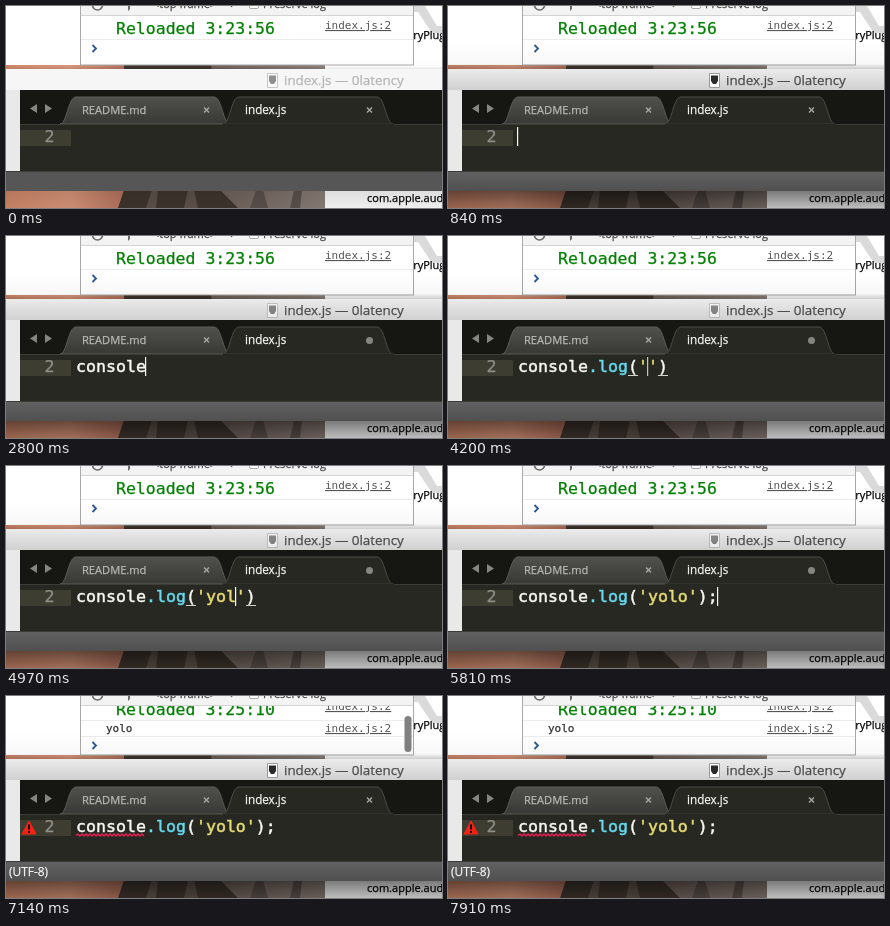
Write an HTML page that moves like this. It is 436 px wide and 202 px high and loops after 8 s.

```html
<!DOCTYPE html>
<html lang="en">
<head>
<meta charset="utf-8">
<title>Typing in an editor</title>
<style>
html, body { margin: 0; width: 100%; height: 100%; overflow: hidden; background: #fff; }
svg { display: block; width: 436px; height: 202px; }
text {
  font-family: "Open Sans", "Noto Sans", sans-serif; white-space: pre;
  fill: currentColor; stroke: currentColor; stroke-width: .25;
}
.mono { font-family: "DejaVu Sans Mono", monospace; }
.code { font-size: 16.6px; color: #f8f8f2; stroke-width: .5; }
.small { font-size: 11px; }
.link { color: #545454; stroke: none; text-decoration: underline; }
.cross { stroke: #a8a8a2; stroke-width: 1.4; fill: none; }
.on { display: none; }
.active .on { display: inline; }
.active .off { display: none; }
#title { font-size: 13.4px; color: #b4b4b4; }
.active #title { color: #4b4b4b; }
</style>
</head>
<body>
<svg id="stage" viewBox="0 0 436 202">
  <defs>
    <linearGradient id="sky">
      <stop offset="0" stop-color="#d0886a"/><stop offset=".2" stop-color="#d9967a"/>
      <stop offset=".36" stop-color="#b8755f"/><stop offset=".6" stop-color="#6b5d56"/>
      <stop offset="1" stop-color="#8c8079"/>
    </linearGradient>
    <linearGradient id="bar" x2="0" y2="1">
      <stop offset="0" stop-color="#ebebeb"/><stop offset="1" stop-color="#d0d0d0"/>
    </linearGradient>
    <linearGradient id="tabFill" x2="0" y2="1">
      <stop offset="0" stop-color="#50514c"/><stop offset="1" stop-color="#383934"/>
    </linearGradient>
    <linearGradient id="status" x2="0" y2="1">
      <stop offset="0" stop-color="#626262"/><stop offset="1" stop-color="#505050"/>
    </linearGradient>
    <linearGradient id="above" x2="0" y2="1">
      <stop offset="0" stop-opacity="0"/><stop offset=".8" stop-opacity=".03"/><stop offset="1" stop-opacity=".2"/>
    </linearGradient>
    <linearGradient id="below" x2="0" y2="1">
      <stop offset="0" stop-opacity=".52"/><stop offset="1" stop-opacity=".26"/>
    </linearGradient>
    <clipPath id="body"><rect x="75" y="10" width="332" height="49"/></clipPath>
    <path id="tab" d="M54 118C61 118 62 91 70 91H208C216 91 217 118 224 118Z"/>
  </defs>

  <!-- desktop and file list -->
  <rect width="320" height="202" fill="url(#sky)"/>
  <path d="M112 202L118 184V57H205L214 184 232 202Z" fill="#40362f"/>
  <path d="M140 202L146 184H152L150 202ZM178 202L182 184H188L192 202Z" fill="#5f534b"/>
  <path d="M244 202L250 184H257L262 202ZM284 202L288 184H296L294 202Z" fill="#5c524d"/>
  <rect x="319" width="117" height="202" fill="#fff"/>
  <path d="M408 0H419L431 20H436V27H426L412 6H408Z" fill="#dadada"/>
  <text class="small" x="400.5" y="33">oryPlugin</text>
  <text class="small" x="361" y="196">com.apple.audio</text>

  <!-- console -->
  <rect width="75" height="59" fill="#fff"/>
  <rect x="74.500" y="-1" width="333" height="60" fill="#fff" stroke="#a9a9a9"/>
  <rect x="75" width="332" height="9" fill="#f3f3f3"/>
  <path d="M75 9.500H407" stroke="#d4d4d4"/>
  <circle cx="91.500" cy="-1" r="5" fill="none" stroke="#6a6a6a" stroke-width="1.6"/>
  <path d="M119 0H124V3L122 5V0ZM222 -3H229L225.500 1.500Z" fill="#6a6a6a"/>
  <rect x="243.500" y="-7" width="9" height="9.500" rx="1.500" fill="#fff" stroke="#aaa"/>
  <g class="small" color="#444">
    <text x="147" y="2">&lt;top frame&gt;</text>
    <text x="257" y="2">Preserve log</text>
  </g>
  <g clip-path="url(#body)">
    <g id="row">
      <text id="log" class="mono" x="110" y="28" font-size="16.5" color="#008000"></text>
      <text class="mono small link" x="319" y="23">index.js:2</text>
      <path d="M75 33.500H407" stroke="#ececec"/>
    </g>
    <g id="output">
      <text class="mono small" x="100" y="36" color="#303030" stroke="none">yolo</text>
      <text class="mono small link" x="319" y="36">index.js:2</text>
      <path d="M75 40.500H407" stroke="#ececec"/>
    </g>
    <path id="prompt" d="M86.500 39L90 42.500 86.500 46" fill="none" stroke="#2c5796" stroke-width="1.800"/>
    <rect id="thumb" x="398.500" y="20" width="7" height="36" rx="3.500" fill="#808080"/>
  </g>

  <!-- editor window -->
  <rect class="off" y="50" width="436" height="13" fill="url(#above)" opacity=".5"/>
  <rect class="on" y="36" width="436" height="27" fill="url(#above)"/>
  <rect y="63" width="436" height="21" fill="#f6f6f6"/>
  <rect class="on" y="63" width="436" height="21" fill="url(#bar)"/>
  <g id="icon">
    <path d="M261.500 67.500H271.500V81.500H261.500Z" fill="#fff" stroke="#999"/>
    <path d="M263 69.500H270V75L268 78H265L263 75Z" fill="#2a2a2a"/>
  </g>
  <text id="title" x="278" y="79">index.js — 0latency</text>

  <rect y="84" width="14" height="81" fill="#e9e9e9"/>
  <rect x="14" y="84" width="422" height="34" fill="#161713"/>
  <rect x="14" y="118" width="422" height="47" fill="#272822"/>
  <path d="M31 98V107L24 102.500ZM39 98V107L46 102.500Z" fill="#858681"/>
  <use href="#tab" fill="url(#tabFill)" stroke="#5c5d57"/>
  <path d="M14 118.500H436" stroke="#3c3d37"/>
  <use href="#tab" x="163" fill="#272822" stroke="#4c4d46"/>
  <rect x="217" y="117.500" width="171" height="2" fill="#272822"/>
  <text x="76" y="108" font-size="11.100" color="#b9b9b3">README.md</text>
  <text x="239" y="108" font-size="11.700" color="#f4f4f0">index.js</text>
  <path class="cross" d="M198 101.500l5 5m0-5l-5 5"/>
  <path id="close" class="cross" d="M361 101.500l5 5m0-5l-5 5"/>
  <circle id="dot" cx="363.500" cy="104.500" r="3.500" fill="#85867f"/>

  <rect x="14" y="124" width="51" height="16" fill="#3e3d32"/>
  <text class="mono" x="38.500" y="136" font-size="16.600" color="#8f908a">2</text>
  <text class="mono code" x="70" y="136"><tspan id="word"></tspan><tspan id="prop"></tspan><tspan id="open"></tspan><tspan id="str" fill="#e6db74" stroke="#e6db74"></tspan><tspan id="end"></tspan></text>
  <path id="pair" fill="none" stroke="#d0d0c8"/>
  <rect id="caret" y="121" width="1.200" height="19" fill="#f8f8f0"/>

  <rect y="165" width="436" height="20" fill="#565656"/>
  <rect class="on" y="165" width="436" height="20" fill="url(#status)"/>
  <path d="M0 165.500H436" stroke="#3a3a38"/>
  <rect class="off" y="185" width="436" height="17" fill="url(#below)" opacity=".25"/>
  <rect class="on" y="185" width="436" height="17" fill="url(#below)"/>

  <g id="lint">
    <path d="M23 125L30 138H16Z" fill="#f5220f" stroke="#f5220f" stroke-linejoin="round"/>
    <path d="M23 128.500V133.500M23 135V137" stroke="#100" stroke-width="2"/>
    <path id="wave" fill="none" stroke="#f0205a" stroke-width="1.300"/>
    <text x="3" y="179.500" font-size="11.900" color="#f4f4f4" stroke-width=".5">(UTF-8)</text>
  </g>
</svg>
<script>
const LOOP = 8000, SAVED = 6160, CELL = 10, LEFT = 70;
const CODE = "console.log('yolo');";

// time, keys typed, caret opacity
const KEYS = [
  [0, 0, 0], [840, 0, 1], [1120, 0, .7], [1190, 0, .35], [1260, 0, 0],
  [1400, 1, 1], [1610, 2, 1], [1890, 2, .7], [1960, 3, 1], [2030, 4, 1], [2170, 5, 1],
  [2450, 5, .7], [2590, 6, 1], [2800, 7, 1], [2940, 8, 1], [3080, 9, 1], [3220, 10, 1], [3360, 11, 1],
  [3640, 11, .7], [3780, 12, 1], [3920, 13, 1], [4200, 13, .75], [4340, 13, .35],
  [4480, 14, 1], [4690, 15, 1], [4900, 16, 1], [5110, 17, 1],
  [5390, 18, 1], [5530, 19, 1], [5810, 20, 1],
  [6510, 20, .7], [6580, 20, .35], [6720, 20, 0], [7210, 20, .5], [7350, 20, 1],
  [7630, 20, .7], [7700, 20, .35], [7770, 20, 0]
];
// time, scrollbar opacity
const THUMB = [[0, 0], [7140, 1], [7700, .75], [7770, .5], [7840, .25], [7910, 0]];

const el = {};
document.querySelectorAll("[id]").forEach(e => el[e.id] = e);
const at = (steps, t) => steps.filter(s => s[0] <= t).pop();
const show = (e, on) => e.style.display = on ? "inline" : "none";
const put = (e, s) => { if (e.textContent !== s) e.textContent = s; };

let wave = "M70 139.5";
for (let i = 1; i <= 34; i++) wave += `L${70 + i * 2} ${i % 2 ? 138 : 140}`;
el.wave.setAttribute("d", wave);

// auto-closed characters to the right of the caret
function tail(n) {
  if (n < 12 || n > 18) return "";
  return n > 12 && n < 18 ? "')" : ")";
}

function draw(t) {
  const [, n, glow] = at(KEYS, t);
  const line = CODE.slice(0, n) + tail(n);
  const closing = line.lastIndexOf(")");
  const strEnd = closing < 0 ? 12 : closing;
  const dirty = n > 0 && t < SAVED;
  const propColor = n > 10 ? "#66d9ef" : "#f8f8f2";

  put(el.word, line.slice(0, 7));
  put(el.prop, line.slice(7, 11));
  el.prop.setAttribute("fill", propColor);
  el.prop.setAttribute("stroke", propColor);
  put(el.open, line.slice(11, 12));
  put(el.str, line.slice(12, strEnd));
  put(el.end, line.slice(strEnd));

  show(el.pair, n > 11 && n < 20);
  const px = LEFT + closing * CELL;
  el.pair.setAttribute("d", `M180 139.500h10M${px} 139.500h10`);
  el.caret.setAttribute("x", LEFT - 1 + n * CELL);
  el.caret.setAttribute("opacity", glow);

  el.stage.classList.toggle("active", t >= 840);
  el.icon.setAttribute("opacity", t < 840 || dirty ? .5 : 1);
  show(el.close, !dirty);
  show(el.dot, dirty);
  show(el.lint, t >= SAVED);

  const printed = t >= 7140;
  put(el.log, "Reloaded " + (t < 7000 ? "3:23:56" : "3:25:10"));
  el.row.setAttribute("transform", `translate(0 ${printed ? -9 : 0})`);
  el.prompt.setAttribute("transform", `translate(0 ${printed ? 7 : 0})`);
  show(el.output, printed);
  el.thumb.setAttribute("opacity", at(THUMB, t)[1]);
}

const start = performance.now();
function tick() {
  draw((performance.now() - start) % LOOP);
  requestAnimationFrame(tick);
}
tick();
</script>
</body>
</html>
```
